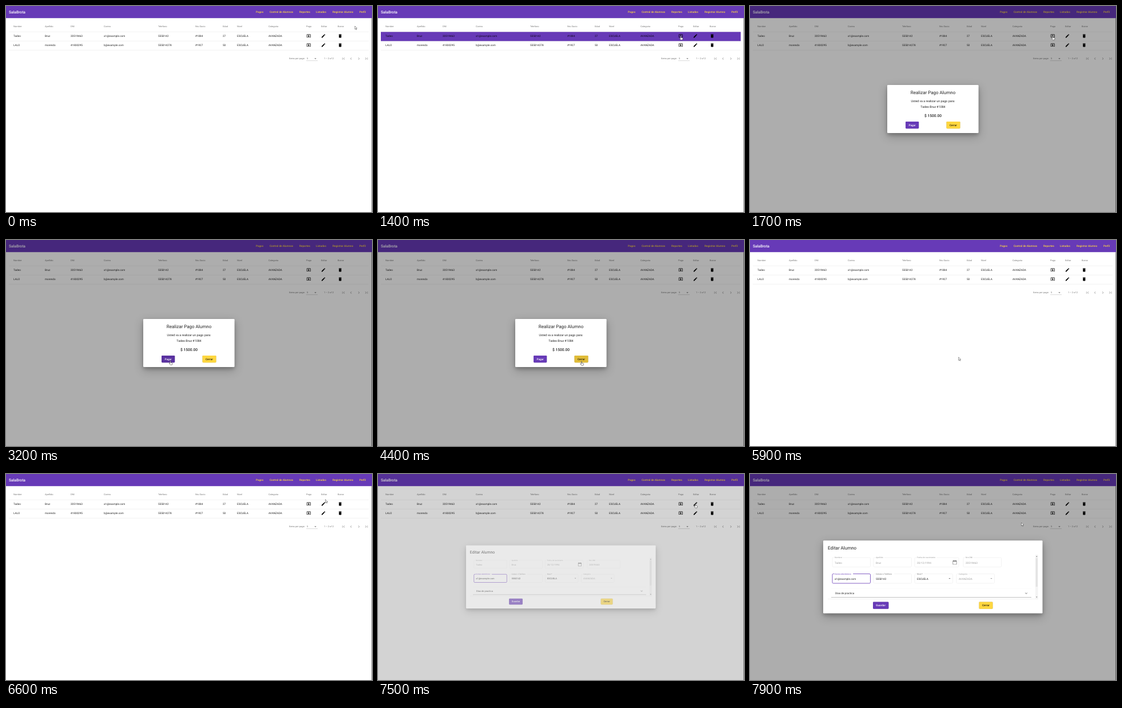
These frames come from a looping animation (640 px wide and 360 px high, 8000 ms). An HTML page:

```html
<!DOCTYPE html>
<html lang="es">
<head>
<meta charset="utf-8">
<title>Control de Alumnos</title>
<style>
  html, body { margin: 0; width: 100%; height: 100%; overflow: hidden; background: #fff; }
  svg { display: block; width: 640px; height: 360px; }
  text { font-family: Roboto, Arial, sans-serif; text-rendering: geometricPrecision; white-space: pre; }
  .panel { filter: drop-shadow(0 3px 3px rgba(0,0,0,.22)) drop-shadow(0 5px 8px rgba(0,0,0,.24)); }
  .btn { filter: drop-shadow(0 .8px .7px rgba(0,0,0,.3)); }
</style>
</head>
<body>
<svg id="stage" viewBox="0 0 640 360"></svg>
<script>
const LOOP = 8000, STEP = 100;
const PURPLE = '#673ab7', AMBER = '#ffd740';
const INK = 'rgba(0,0,0,.87)', SOFT = 'rgba(0,0,0,.54)', PALE = 'rgba(0,0,0,.38)', RULE = 'rgba(0,0,0,.14)';

const text = (x, y, s, size = 4.67, fill = INK, extra = '') =>
  `<text x="${x}" y="${y}" font-size="${size}" fill="${fill}" ${extra}>${s}</text>`;
const centred = (x, y, s, size, fill, weight = 400) =>
  text(x, y, s, size, fill, `text-anchor="middle" font-weight="${weight}"`);
const rect = (x, y, w, h, fill, extra = '') =>
  `<rect x="${x}" y="${y}" width="${w}" height="${h}" fill="${fill}" ${extra}/>`;
const line = (x1, x2, y, stroke = RULE, w = .4) =>
  `<path d="M${x1} ${y}H${x2}" stroke="${stroke}" stroke-width="${w}"/>`;
const triangle = (x, y, fill = SOFT) => `<path d="M${x - 1.7} ${y - .8}h3.4l-1.7 1.7z" fill="${fill}"/>`;
// 24-unit icon centred on a point
const icon = (x, y, d, fill = '#000') =>
  `<path transform="translate(${x - 4.2} ${y - 4.2}) scale(.35)" d="${d}" fill="${fill}"/>`;

const ICONS = {
  cash: 'M11 17h2v-1h1c.55 0 1-.45 1-1v-3c0-.55-.45-1-1-1h-3v-1h4V8h-2V7h-2v1h-1c-.55 0-1 .45-1 1v3c0 .55.45 1 1 1h3v1H9v2h2zM20 4H4a2 2 0 0 0-2 2v12a2 2 0 0 0 2 2h16a2 2 0 0 0 2-2V6a2 2 0 0 0-2-2zm0 14H4V6h16z',
  pencil: 'M3 17.25V21h3.75L17.8 9.94l-3.75-3.75zM20.7 7.04a1 1 0 0 0 0-1.41l-2.34-2.34a1 1 0 0 0-1.41 0l-1.83 1.83 3.75 3.75z',
  bin: 'M6 19a2 2 0 0 0 2 2h8a2 2 0 0 0 2-2V7H6zM19 4h-3.5l-1-1h-5l-1 1H5v2h14z',
  date: 'M20 3h-1V1h-2v2H7V1H5v2H4a2 2 0 0 0-2 2v16a2 2 0 0 0 2 2h16a2 2 0 0 0 2-2V5a2 2 0 0 0-2-2zm0 18H4V8h16z',
  left: 'M15.4 7.4 14 6l-6 6 6 6 1.4-1.4L10.8 12z',
  right: 'M10 6 8.6 7.4l4.6 4.6-4.6 4.6L10 18l6-6z',
  first: 'M18.4 16.6 13.8 12l4.6-4.6L17 6l-6 6 6 6zM6 6h2v12H6z',
  last: 'M5.6 7.4l4.6 4.6-4.6 4.6L7 18l6-6-6-6zM16 6h2v12h-2z',
  down: 'M16.6 8.6 12 13.2 7.4 8.6 6 10l6 6 6-6z'
};

const COLS = [13, 68, 113, 171, 266, 331, 379, 404, 459];
const HEADS = ['Nombre', 'Apellido', 'DNI', 'Correo', 'Telefono', 'Nro Socio', 'Edad', 'Nivel', 'Categoria'];
const ROWS = [
  ['Tadeo', 'Bruz', '20519463', 'a1@example.com', '5550142', '#1084', '27', 'ESCUELA', 'AVANZADA'],
  ['LALO', 'morendo', '41830295', 'b@example.com', '555014278', '#1927', '50', 'ESCUELA', 'AVANZADA']
];
const NAV = [[437, 'Pagos'], [461, 'Control de Alumnos'], [513, 'Reportes'],
  [542, 'Listados'], [571, 'Registrar Alumno'], [618, 'Perfil']];

function page() {
  let s = rect(0, 0, 640, 360, '#fff') + rect(0, 0, 640, 21.2, PURPLE);
  s += text(5, 13, 'SalaBrota', 6.67, '#fff', 'font-weight="500"');
  NAV.forEach(([x, name]) => s += text(x, 12.2, name, 4.67, AMBER, 'font-weight="500"'));
  s += [0, 1].map(i => rect(5, 45.3 + i * 16, 629.3, 16, PURPLE, `id="row${i}"`)).join('');
  HEADS.forEach((h, i) => s += text(COLS[i], 37, h, 4, SOFT));
  s += text(525, 37, 'Pago', 4, SOFT) + text(551, 37, 'Editar', 4, SOFT) + text(580, 37, 'Borrar', 4, SOFT);
  ROWS.forEach((row, i) => {
    const y = 52.3 + i * 16;
    row.forEach((v, c) => s += text(COLS[c], y + 1.8, v));
    s += icon(529.3, y, ICONS.cash) + icon(555, y, ICONS.pencil) + icon(584.3, y, ICONS.bin);
  });
  s += [45.2, 61.2, 77.2].map(y => line(5, 634.3, y)).join('');
  s += text(495, 93.2, 'Items per page:', 4, SOFT) + text(526, 93.2, '5', 4, SOFT);
  s += line(525, 545, 95.6, PALE) + triangle(541, 92) + text(556, 93.2, '1 – 2 of 2', 4, SOFT);
  [[590, 'first'], [603.3, 'left'], [617, 'right'], [630.3, 'last']]
    .forEach(([x, n]) => s += icon(x, 92, ICONS[n], PALE));
  return s + rect(639.2, 21.2, .8, 338.8, '#777');
}

function button(x, y, w, label, main, id = '') {
  const fill = main ? PURPLE : AMBER, ink = main ? '#fff' : INK;
  return rect(x, y, w, 12.2, fill, 'rx="1.33" class="btn"') +
    rect(x, y, w, 12.2, 'rgba(0,0,0,.12)', `rx="1.33" id="${id}"`) +
    centred(x + w / 2, y + 7.8, label, 4.67, ink, 500);
}

const panel = (x, y, w, h) => rect(x, y, w, h, '#fff', 'rx="1.33" class="panel"');

function payDialog() {
  return panel(240, 138, 159.6, 84) +
    centred(320, 154, 'Realizar Pago Alumno', 8, INK) +
    centred(320, 168.2, 'Usted va a realizar un pago para:', 5.33, INK) +
    centred(320, 177.6, 'Tadeo Bruz #1084', 5.33, INK) +
    centred(320, 193.6, '$ 1500.00', 6.67, INK, 500) +
    button(272, 202, 23.2, 'Pagar', true, 'hoverPay') +
    button(343.5, 202, 24, 'Cerrar', false, 'hoverClose');
}

function field(x, y, label, value, { off, focus, pick, w = 66.5 } = {}) {
  const edge = focus ? PURPLE : RULE;
  return rect(x, y, w, 16.5, 'none', `rx="1.6" stroke="${edge}" stroke-width="${focus ? .8 : .35}"`) +
    rect(x + 3.2, y - 1, label.length * 1.75 + 1.5, 2, '#fff') +
    text(x + 4, y + 1.2, label, 3.5, focus ? PURPLE : off ? PALE : SOFT) +
    text(x + 4, y + 10.6, value, 4.67, off ? PALE : INK) +
    (pick ? triangle(x + 61, y + 8.2, off ? PALE : SOFT) : '');
}

function editDialog() {
  const off = true, pick = true, [name, last, dni, mail, phone] = ROWS[0];
  return panel(128, 116.2, 383.5, 127.3) +
    text(136, 132.3, 'Editar Alumno', 8) +
    field(144, 146, 'Nombre', name, { off }) +
    field(216, 146, 'Apellido', last, { off }) +
    field(288, 146, 'Fecha de nacimiento', '20/12/1994', { off, w: 77 }) +
    icon(358, 154.5, ICONS.date, SOFT) +
    field(373, 146, 'Nro DNI', dni, { off }) +
    field(144, 174.5, 'Correo electrónico', mail, { focus: true }) +
    field(216, 174.5, 'Celular o Teléfono', phone) +
    field(288, 174.5, 'Nivel *', 'ESCUELA', { pick }) +
    field(361, 174.5, 'Categoría', 'AVANZADA', { off, pick }) +
    line(142, 492, 200, 'rgba(0,0,0,.06)') +
    text(149, 209.5, 'Días de practica', 4.67) +
    icon(483, 208.5, ICONS.down, SOFT) +
    line(142, 492, 215.6, 'rgba(0,0,0,.5)', .5) +
    line(136, 504, 218.4, RULE) +
    rect(499, 141, 4.6, 77, '#f4f4f4') + rect(499.6, 147, 3.4, 50, '#e4e4e4') +
    `<path d="M500 144.8l1.3-1.6 1.3 1.6zM500 214.4l1.3 1.6 1.3-1.6z" fill="${SOFT}"/>` +
    button(215, 223.5, 27.4, 'Guardar', true, 'hoverSave') +
    button(400.5, 223.5, 24, 'Cerrar', false, 'hoverCancel');
}

const stage = document.getElementById('stage');
stage.innerHTML = page() +
  rect(0, 0, 640, 360, '#000', 'id="shade"') +
  `<g id="pay">${payDialog()}</g><g id="edit">${editDialog()}</g>` +
  `<g id="cursor" fill="#fff" stroke="#222" stroke-width="1.3" stroke-linejoin="round">
    <path id="arrow" transform="scale(.35)" d="M0 0V16L4 12.5 6.5 18.5 9 17.5 6.5 11.5H11.5Z"/>
    <path id="hand" transform="scale(.4) translate(-6.5 0)" d="M5 1.5a1.5 1.5 0 0 1 3 0V8l6 1.5q1.5.5 1.5 2L14 18H6L1 11.5c-.8-1.2.8-2.3 2-1.2L5 12Z"/>
  </g>`;
const $ = id => document.getElementById(id);

// time, x, y of the pointer tip
const PATH = [
  [0, 610, 35], [100, 610, 35], [900, 545, 50], [1300, 529.5, 52], [1900, 529.5, 52],
  [2800, 287.5, 211], [3500, 287.5, 211], [4400, 356, 212], [5800, 356, 212],
  [6600, 558.5, 44.5], [6700, 558, 47], [7300, 555, 52], [7500, 555, 52], [7900, 474.5, 85], [8000, 474.5, 85]
];
const ramp = (t, from, span) => Math.min(1, Math.max(0, (t - from) / span));
const ease = k => k * k * (3 - 2 * k);

function pointer(t) {
  const i = PATH.findIndex(p => p[0] > t);
  const [a, x, y] = PATH[i - 1], [b, X, Y] = PATH[i];
  const k = ease((t - a) / (b - a));
  return [x + (X - x) * k, y + (Y - y) * k];
}

const show = (id, on) => $(id).setAttribute('visibility', on ? 'inherit' : 'hidden');

function pose(id, k, cx, cy) {
  const s = .7 + .3 * ease(k);
  $(id).setAttribute('opacity', k);
  $(id).setAttribute('transform', `translate(${cx} ${cy}) scale(${s}) translate(${-cx} ${-cy})`);
}

function draw(t) {
  const [x, y] = pointer(t);
  const inside = (l, top, w, h) => x >= l && x <= l + w && y >= top && y <= top + h;
  const pay = Math.min(ramp(t, 1520, 150), 1 - ramp(t, 5760, 80));
  const edit = ramp(t, 7420, 150);
  const open = Math.max(pay, edit);

  $('shade').setAttribute('opacity', .32 * open);
  pose('pay', pay, 320, 180);
  pose('edit', edit, 320, 180);

  [0, 1].forEach(i => show('row' + i, !open && inside(5, 45.3 + 16 * i, 629, 15.9)));
  const onPay = pay > 0 && inside(272, 202, 23.2, 12.2);
  const onClose = pay > 0 && inside(343.5, 202, 24, 12.2);
  show('hoverPay', onPay);
  show('hoverClose', onClose);
  show('hoverSave', false);
  show('hoverCancel', false);

  const onIcon = [529.3, 555, 584.3].some(c => inside(c - 4, 48, 8, 8));
  const hand = onPay || onClose || onIcon;
  show('hand', hand);
  show('arrow', !hand);
  $('cursor').setAttribute('transform', `translate(${x} ${y})`);
}

const start = performance.now();
function tick() {
  const t = (performance.now() - start) % LOOP;
  draw(Math.floor(t / STEP) * STEP);
  requestAnimationFrame(tick);
}
tick();
</script>
</body>
</html>
```
